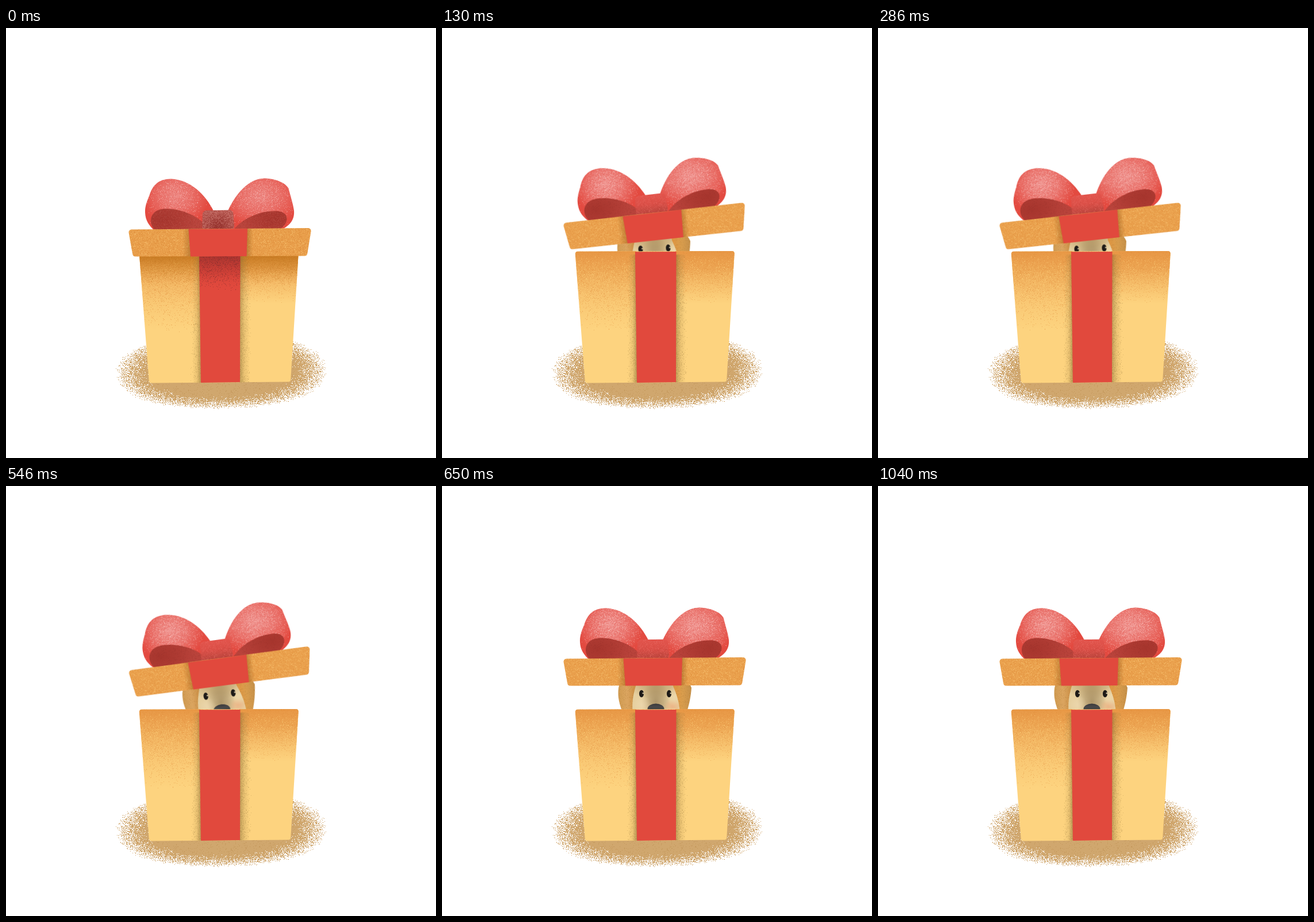
An HTML page with a canvas for the animation above (1.3 s loop, 748 by 748 pixels).

```html
<!DOCTYPE html>
<html lang="en">
<head>
<meta charset="utf-8">
<title>Gift box</title>
<style>
  html, body { margin: 0; width: 100%; height: 100%; overflow: hidden; background: #fff; }
  canvas { display: block; width: 100vw; height: 100vh; object-fit: contain; }
</style>
</head>
<body>
<canvas id="stage" width="748" height="748"></canvas>
<script>
const SIZE = 748, LOOP = 1300;
const RED = '#e1493d';
const stage = document.getElementById('stage').getContext('2d');

let seed = 7;
function random() {
  seed = (seed * 1664525 + 1013904223) >>> 0;
  return seed / 4294967296;
}
const clamp = v => Math.max(0, Math.min(1, v));
const falloff = (x, y, cx, cy, rx, ry) =>
  Math.exp(-(((x - cx) / rx) ** 2) - ((y - cy) / ry) ** 2);

function layer(draw) {
  const canvas = document.createElement('canvas');
  canvas.width = canvas.height = SIZE;
  draw(canvas.getContext('2d'));
  return canvas;
}

function polygon(points, radius) {
  const path = new Path2D(), n = points.length;
  const [a, b] = points;
  path.moveTo((a[0] + b[0]) / 2, (a[1] + b[1]) / 2);
  for (let i = 1; i <= n; i++) path.arcTo(...points[i % n], ...points[(i + 1) % n], radius);
  path.closePath();
  return path;
}

function fill(g, path, color) {
  g.fillStyle = color;
  g.fill(path);
}

function ellipse(g, x, y, rx, ry, color) {
  g.fillStyle = color;
  g.beginPath();
  g.ellipse(x, y, rx, ry, 0, 0, 7);
  g.fill();
}

function inside(g, path, draw) {
  g.save();
  g.clip(path);
  draw();
  g.restore();
}

function linear(g, x0, y0, x1, y1, ...colors) {
  const gradient = g.createLinearGradient(x0, y0, x1, y1);
  colors.forEach((c, i) => gradient.addColorStop(i / (colors.length - 1), c));
  return gradient;
}

function glow(g, x, y, rx, ry, rgb, alpha) {
  g.save();
  g.translate(x, y);
  g.scale(rx, ry);
  const gradient = g.createRadialGradient(0, 0, 0, 0, 0, 1);
  gradient.addColorStop(0, `rgba(${rgb},${alpha})`);
  gradient.addColorStop(.5, `rgba(${rgb},${alpha * .6})`);
  gradient.addColorStop(1, `rgba(${rgb},0)`);
  g.fillStyle = gradient;
  g.fillRect(-1, -1, 2, 2);
  g.restore();
}

function grain(g, [left, top, right, bottom], color, density, dot = 1) {
  g.fillStyle = color;
  for (let y = top; y < bottom; y += dot)
    for (let x = left; x < right; x += dot)
      if (random() < density(x, y)) g.fillRect(x, y, dot, dot);
}

function band(g, left, right, top, bottom, style) {
  g.fillStyle = style;
  g.fillRect(left, top, right - left, bottom - top);
}

const ground = layer(g => {
  const density = (x, y) => {
    const lean = (x - 374) * .015;
    const dx = Math.abs(x - 374) / 181, dy = Math.abs(y - 597 + lean) / 64;
    const r = (dx ** 2.3 + dy ** 2.3) ** (1 / 2.3);
    return clamp((1.02 - r) / .38) ** 1.1;
  };
  const area = [185, 525, 565, 672];
  grain(g, area, '#d0a76e', density);
  grain(g, area, '#d0a76e', density);
  grain(g, area, '#c3975a', (x, y) => density(x, y) * .06);
});

function makeBox(closed) {
  return layer(g => {
    const body = polygon([[231.5, 388.7], [509, 388], [495, 615.5], [249, 617.5]], 4);
    const ribbon = polygon([[336, 389.3], [407.5, 389], [407, 616], [339, 617]], .5);
    const area = [230, 386, 511, 530];
    fill(g, body, '#fdd37f');
    inside(g, body, () => {
      band(g, 230, 338, 386, 530, linear(g, 0, 389, 0, 525,
        'rgba(232,152,70,1)', 'rgba(234,158,76,.66)', 'rgba(238,168,84,.26)', 'rgba(240,175,90,0)'));
      band(g, 406, 511, 386, 482, linear(g, 0, 389, 0, 480,
        'rgba(232,152,70,1)', 'rgba(233,155,73,.8)', 'rgba(236,163,80,.4)', 'rgba(240,175,90,0)'));
      const fade = (x, y) => clamp(1 - (y - 389) / (x < 370 ? 140 : 90));
      grain(g, area, 'rgba(226,144,62,.5)', (x, y) => fade(x, y) * .25);
      grain(g, area, 'rgba(253,211,127,.55)', (x, y) => fade(x, y) * clamp((y - 395) / 40) * .22);

      if (closed) {
        band(g, 230, 511, 386, 445, linear(g, 0, 395, 0, 445,
          'rgba(192,115,25,.8)', 'rgba(200,125,35,.35)', 'rgba(220,145,60,0)'));
        grain(g, area, 'rgba(190,115,30,.4)', (x, y) => clamp(1 - (y - 397) / 55) * .3);
      }
      band(g, 324, 339, 394, 618, linear(g, 324, 0, 339, 0,
        'rgba(150,120,60,0)', 'rgba(145,115,55,.14)', 'rgba(130,100,45,.55)'));
      band(g, 406, 424, 394, 618, linear(g, 406, 0, 424, 0,
        'rgba(130,100,45,.5)', 'rgba(145,115,55,.16)', 'rgba(150,120,60,0)'));
      grain(g, [320, 396, 340, 618], 'rgba(150,120,60,.3)', x => clamp((x - 320) / 18) * .25);
      grain(g, [406, 396, 427, 618], 'rgba(150,120,60,.3)', x => clamp((427 - x) / 20) * .3);
    });
    fill(g, ribbon, RED);
    if (closed) inside(g, ribbon, () => {
      band(g, 335, 409, 390, 455, linear(g, 0, 395, 0, 455,
        'rgba(150,45,42,.75)', 'rgba(175,50,45,.4)', 'rgba(225,73,61,0)'));
      grain(g, [335, 395, 409, 460], 'rgba(125,45,45,.5)', (x, y) => clamp(1 - (y - 395) / 62) * .3);
    });
  });
}

const loops = [
  {
    outer: new Path2D('M359 268C345 240 319 214 285 212.5C263 212.5 253 224 247.5 241C242 254 239.5 262 240 271C240.5 285 247 294 256 302H345V268Z'),
    inner: new Path2D('M258 302C245 291 247 268 270 265C298 262 330 276 344 292V302Z'),
    light: [293, 242, 34, 34], dark: [270, 284], box: [237, 209, 362, 302]
  },
  {
    outer: new Path2D('M384 268C398 238 420 212 448 211.5C466 212 484 219 489.5 229C492.5 242 497 254 499 268C500 282 494 293 475 302H390V268Z'),
    inner: new Path2D('M393 302C410 280 442 267 470 268.5C490 270 491 287 477 298L470 302Z'),
    light: [440, 243, 42, 34], dark: [466, 282], box: [382, 209, 502, 302]
  }
];

function makeLid(closed) {
  return layer(g => {
    for (const { outer, inner, light: [cx, cy, rx, ry], dark, box } of loops) {
      fill(g, outer, '#e34a40');
      inside(g, outer, () => {
        glow(g, cx, cy, rx * 1.7, ry * 1.6, '243,168,165', closed ? .65 : .75);
        grain(g, box, 'rgba(250,195,192,.5)',
          (x, y) => falloff(x, y, cx, cy, rx, ry) * (closed ? .25 : .4));
        grain(g, box, 'rgba(222,85,78,.4)', (x, y) => falloff(x, y, cx, cy, rx, ry) * .25);
      });
      fill(g, inner, '#b9433b');
      inside(g, inner, () => {
        glow(g, ...dark, 60, 40, '160,48,40', .75);
        grain(g, box, 'rgba(145,48,42,.35)', () => .1);
        if (closed) grain(g, box, 'rgba(190,90,82,.4)', () => .18);
      });
    }

    const knot = polygon([[340, 267.5], [393, 266.5], [395.5, 302], [339, 302]], 7);
    fill(g, knot, closed ? '#b0514a' : linear(g, 0, 267, 0, 300, '#e2544c', '#db4f47', '#bd473f'));
    inside(g, knot, () => {
      const area = [338, 265, 397, 302];
      if (closed) {
        glow(g, 367, 296, 32, 26, '140,40,36', .7);
        grain(g, area, 'rgba(215,135,128,.5)',
          (x, y) => .1 + .34 * clamp(Math.hypot((x - 368) / 30, (y - 297) / 32)));
      } else {
        grain(g, area, 'rgba(240,120,112,.4)', () => .16);
        grain(g, area, 'rgba(165,55,48,.35)', (x, y) => clamp((y - 275) / 25) * .22);
      }
    });

    const lid = polygon([[210.5, 300.5], [529.5, 298], [521.5, 346.5], [219, 347.5]], 5);
    const area = [209, 296, 531, 349];
    fill(g, lid, '#e99f4c');
    inside(g, lid, () => {
      grain(g, area, 'rgba(248,195,112,.45)', () => closed ? .15 : .2);
      grain(g, area, 'rgba(250,200,120,.35)', () => .09, 2);
      grain(g, area, 'rgba(218,132,48,.4)', () => .14);
      if (closed) grain(g, area, 'rgba(205,120,40,.35)', () => .12);
      band(g, 305, 320, 299, 349, linear(g, 305, 0, 320, 0, 'rgba(150,95,30,0)', 'rgba(140,85,25,.5)'));
      band(g, 416, 428, 299, 349, linear(g, 416, 0, 428, 0, 'rgba(140,85,25,.5)', 'rgba(150,95,30,0)'));
    });
    fill(g, polygon([[315.5, 300], [418, 299], [416.5, 347], [319, 347.5]], .5), RED);
  });
}

const dog = layer(g => {
  const head = new Path2D('M326 326H414L424 400H316Z');
  const ears = [
    new Path2D('M338 330C318 332 309 340 307 352C305 368 309 380 315 396H332C330 378 332 365 337 348Z'),
    new Path2D('M400 330C420 331 430 339 434 351C433 366 430 380 425 396H414C413 378 409 364 402 348Z')
  ];
  fill(g, head, '#e6cf9f');
  inside(g, head, () => {
    glow(g, 372, 345, 48, 26, '175,145,92', .75);
    glow(g, 372, 375, 25, 36, '150,125,82', .7);
    glow(g, 348, 381, 16, 16, '238,218,178', .6);
    glow(g, 401, 383, 15, 12, '238,168,122', .65);
    glow(g, 404, 366, 12, 18, '242,222,180', .5);
  });
  fill(g, ears[0], linear(g, 306, 0, 338, 0, '#cf9a50', '#dba560', '#c98d43'));
  fill(g, ears[1], linear(g, 402, 0, 434, 0, '#df9540', '#d99d4d', '#c59049'));
  for (const ear of ears) inside(g, ear, () =>
    grain(g, [304, 328, 436, 398], 'rgba(165,115,50,.3)', () => .1));

  for (const x of [347, 395]) {
    ellipse(g, x, 361.3, 4, 6.3, '#1d1a17');
    ellipse(g, x + 2.8, 360.5, 1.3, 1.2, '#d9c9a5');
  }
  ellipse(g, 372, 388, 14.5, 9.5, linear(g, 0, 378, 0, 392, '#39383a', '#4b4a4b', '#1e1d1f'));
});

const closedBox = makeBox(true), openBox = makeBox(false);
const closedLid = makeLid(true), openLid = makeLid(false);

// Each pose holds until the next one; lid and dog are [dx, dy, degrees].
const poses = [
  { at: 0, box: closedBox, top: closedLid, lid: [2, 50, 0] },
  { at: 130, box: openBox, top: openLid, lid: [1, 22, -6] , dog: [-1.5, 22.5, -2.5] },
  { at: 390, box: openBox, top: openLid, lid: [3.5, .3, -7.2], dog: [.5, 1.5, -7] },
  { at: 650, box: openBox, top: openLid, lid: [0, 0, 0], dog: [0, 0, 0] }
];

function place(image, cx, cy, [dx, dy, degrees]) {
  stage.save();
  stage.translate(cx + dx, cy + dy);
  stage.rotate(degrees * Math.PI / 180);
  stage.drawImage(image, -cx, -cy);
  stage.restore();
}

let shown;
function render(time) {
  const pose = poses.findLast(p => p.at <= time);
  if (pose === shown) return;
  shown = pose;
  stage.fillStyle = '#fff';
  stage.fillRect(0, 0, SIZE, SIZE);
  stage.drawImage(ground, 0, 0);
  if (pose.dog) place(dog, 371, 361.5, pose.dog);
  stage.drawImage(pose.box, 0, 0);
  place(pose.top, 370.25, 323, pose.lid);
}

const start = performance.now();
function tick() {
  render((performance.now() - start) % LOOP);
  requestAnimationFrame(tick);
}
tick();
</script>
</body>
</html>
```
